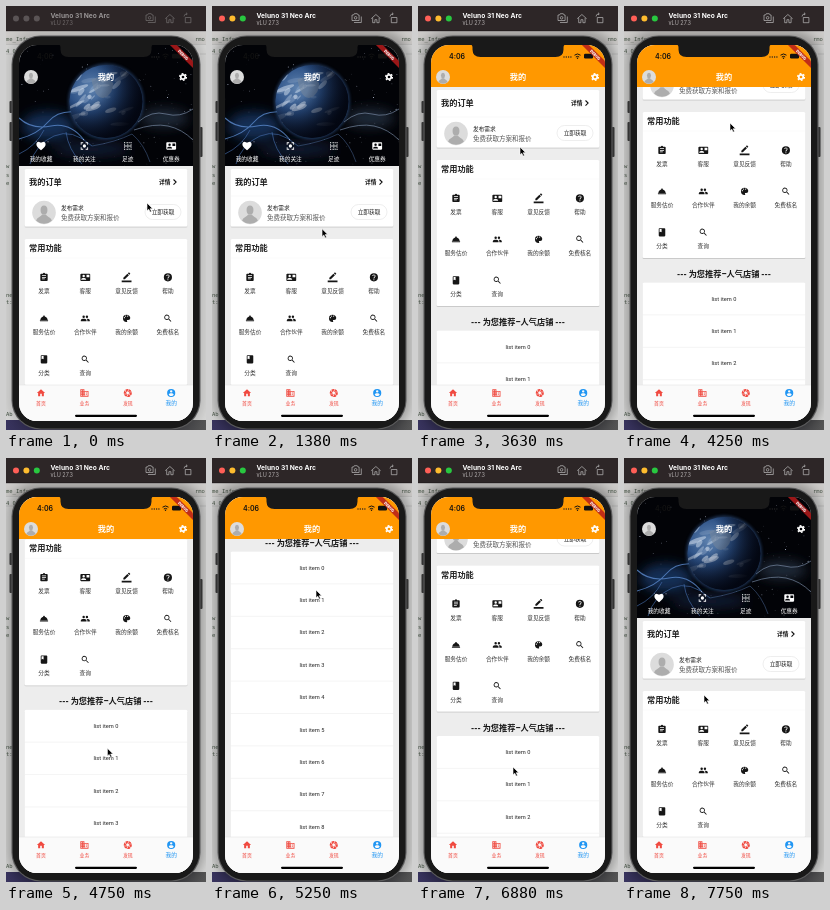
These frames come from a looping animation (200x424 px, 8 s). An HTML page:

```html
<!DOCTYPE html>
<html lang="zh-CN">
<head>
<meta charset="utf-8">
<style>
html, body { margin: 0; width: 100%; height: 100%; overflow: hidden; background: #d9d9d8; }
svg { display: block; width: 200px; height: 424px; }
text { font-family: Roboto, "Noto Sans CJK SC", "Noto Sans CJK", sans-serif; white-space: pre; }
.ui { font-family: Inter, sans-serif; }
.code { font-family: "DejaVu Sans Mono", monospace; }
</style>
</head>
<body>
<svg id="stage" viewBox="0 0 200 424" xmlns="http://www.w3.org/2000/svg"></svg>
<script>
const LOOP = 8000, STEP = 125, FOLD = 79;

const icons = {
  home: 'M10 20v-6h4v6h5v-8h3L12 3 2 12h3v8z',
  building: 'M12 7V3H2v18h20V7zM4 5h2v2H4zM8 5h2v2H8zM4 9h2v2H4zM8 9h2v2H8zM4 13h2v2H4zM8 13h2v2H8zM4 17h2v2H4zM8 17h2v2H8zM12 9h8v10h-8v-2h2v-2h-2v-2h2v-2h-2zM16 11h2v2h-2zM16 15h2v2h-2z',
  shutter: 'M9.4 10.5l4.8-8.3A10 10 0 0 0 5.700 4.250l3.600 6.350zM21.500 9a10 10 0 0 0-6-6.300L11.900 9zM21.800 10h-7.500l5 8.800A10 10 0 0 0 21.800 10zM8.500 12L4.600 5.250A10 10 0 0 0 2.200 14h7.500zM2.500 15a10 10 0 0 0 6 6.300L12.100 15zM13.700 15l-3.900 6.800a10 10 0 0 0 8.500-2l-3.700-6.400z',
  account: 'M12 2a10 10 0 1 0 0 20 10 10 0 0 0 0-20zm0 3a3 3 0 1 1 0 6 3 3 0 0 1 0-6zm0 14.2c-2.5 0-4.7-1.3-6-3.2 0-2 4-3.1 6-3.1s6 1.1 6 3.1c-1.3 1.9-3.5 3.2-6 3.2z',
  note: 'M19 3h-4.2a3 3 0 0 0-5.6 0H5a2 2 0 0 0-2 2v14a2 2 0 0 0 2 2h14a2 2 0 0 0 2-2V5a2 2 0 0 0-2-2zM14 17H7v-2h7zM17 13H7v-2h10zM17 9H7V7h10z',
  card: 'M22 3H2a2 2 0 0 0-2 2v14a2 2 0 0 0 2 2h20a2 2 0 0 0 2-2V5a2 2 0 0 0-2-2zM8 6a3 3 0 1 1 0 6 3 3 0 0 1 0-6zM14 18H2v-1c0-2 4-3.1 6-3.1s6 1.1 6 3.1zM22 12h-7V6h7z',
  pen: 'M17.7 7L14 3.3l-10 10V17h3.7zM20.7 4a1 1 0 0 0 0-1.4L18.4.3a1 1 0 0 0-1.4 0l-2 2L18.7 6zM0 20h24v4H0z',
  help: 'M12 2a10 10 0 1 0 0 20 10 10 0 0 0 0-20zM13 19h-2v-2h2zm2.1-7.7l-.9.9C13.4 12.9 13 13.5 13 15h-2v-.5c0-1.1.4-2.1 1.2-2.8l1.2-1.3A2 2 0 1 0 10 9H8a4 4 0 1 1 8 0c0 .9-.4 1.7-.9 2.3z',
  bell: 'M2 17h20v2H2zM13.8 7.8a2 2 0 1 0-3.6 0C6.2 8.6 3.3 11.9 3 16h18c-.3-4.1-3.2-7.4-7.2-8.2z',
  group: 'M16 11a3 3 0 1 0 0-6 3 3 0 0 0 0 6zM8 11a3 3 0 1 0 0-6 3 3 0 0 0 0 6zM8 13c-2.3 0-7 1.2-7 3.5V19h14v-2.5C15 14.2 10.3 13 8 13zM16 13l-1 .1c1.2.9 2 2 2 3.4V19h6v-2.5c0-2.3-4.7-3.5-7-3.5z',
  palette: 'M12 3a9 9 0 0 0 0 18c1.5 0 2-1.5 1.1-2.5-.8-1-.1-2.5 1.4-2.5H16a5 5 0 0 0 5-5c0-4.400-4-8-9-8zM5 10.500a1.500 1.500 0 1 0 3 0 1.500 1.500 0 0 0-3 0zM8 6.500a1.500 1.500 0 1 0 3 0 1.500 1.500 0 0 0-3 0zM13 6.500a1.500 1.500 0 1 0 3 0 1.500 1.500 0 0 0-3 0z',
  search: 'M15.5 14h-.8l-.3-.3a6.5 6.5 0 1 0-.7.7l.3.3v.8l5 5 1.5-1.5zM9.5 14a4.5 4.5 0 1 1 0-9 4.5 4.5 0 0 1 0 9z',
  book: 'M18 2H6a2 2 0 0 0-2 2v16a2 2 0 0 0 2 2h12a2 2 0 0 0 2-2V4a2 2 0 0 0-2-2zM6 4h5v8l-2.5-1.5L6 12z',
  heart: 'M12 21.4l-1.4-1.4C5.4 15.4 2 12.3 2 8.5A5.4 5.4 0 0 1 7.5 3c1.7 0 3.4.8 4.5 2.1A6 6 0 0 1 16.5 3 5.4 5.4 0 0 1 22 8.5c0 3.8-3.4 6.9-8.5 11.5z',
  focus: 'M12 8a4 4 0 1 0 0 8 4 4 0 0 0 0-8zM5 15H3v6h6v-2H5zM5 5h4V3H3v6h2zM15 3v2h4v4h2V3zM19 19h-4v2h6v-6h-2z'
};

const rect = (x, y, w, h, fill, more = '') =>
  `<rect x="${x}" y="${y}" width="${w}" height="${h}" fill="${fill}" ${more}/>`;
const dot = (x, y, r, fill, more = '') =>
  `<circle cx="${x}" cy="${y}" r="${r}" fill="${fill}" ${more}/>`;
const line = (d, color, w, more = '') =>
  `<path d="${d}" fill="none" stroke="${color}" stroke-width="${w}" ${more}/>`;
// y is the middle of the glyphs
const text = (x, y, s, size, fill, weight = 400, anchor = 'start', more = '') =>
  `<text x="${x}" y="${y + size * 0.36}" font-size="${size}" fill="${fill}" font-weight="${weight}" text-anchor="${anchor}" ${more}>${s}</text>`;
const mid = (x, y, s, size, fill, weight) => text(x, y, s, size, fill, weight, 'middle');

function icon(name, x, y, fill, size = 9.8) {
  const k = size / 24;
  let body = `<path d="${icons[name]}" fill="${fill}" fill-rule="evenodd"/>`;
  if (name === 'grid') {
    body = line('M4 3v18M20 3v18M3 4h18M3 20h18M12 3v18', fill, 2, 'stroke-dasharray="2 2"') + rect(3, 11, 18, 2, fill);
  } else if (name === 'gear') {
    body = dot(12, 12, 5.4, 'none', `stroke="${fill}" stroke-width="4.2"`) +
      dot(12, 12, 8.4, 'none', `stroke="${fill}" stroke-width="3.2" stroke-dasharray="4.4 4.4"`);
  }
  return `<g transform="translate(${x - size / 2} ${y - size / 2}) scale(${k})">${body}</g>`;
}

function avatar(x, y, r) {
  return dot(x, y, r, '#dcdcdc') +
    `<g transform="translate(${x} ${y}) scale(${r / 12})">` +
    '<ellipse cy="-2.5" rx="3.5" ry="4.6" fill="#adadad"/>' +
    '<path d="M-8 8.5C-7 4.5-3 4.5-2 2h4c1 2.5 5 2.5 6 6.5A12 12 0 0 1-8 8.5z" fill="#adadad"/></g>';
}

function random(seed) {
  return (a, b) => {
    seed = seed * 16807 % 2147483647;
    return +(a + seed / 2147483647 * (b - a)).toFixed(2);
  };
}

function stars() {
  const rnd = random(11);
  let out = '';
  for (let i = 0; i < 110; i++) {
    out += dot(rnd(13, 187), rnd(39, 160), rnd(0.15, 0.55), '#dbe6ff', `opacity="${rnd(0.3, 0.9)}"`);
  }
  return out;
}

function clouds() {
  const rnd = random(29);
  let out = '';
  for (let i = 0; i < 34; i++) {
    out += `<ellipse rx="${rnd(0.06, 0.28)}" ry="${rnd(0.02, 0.07)}" fill="#cfdcec" opacity="${rnd(0.15, 0.6)}" ` +
      `transform="translate(${rnd(-0.9, 0.6)} ${rnd(-0.9, 0.8)}) rotate(${rnd(-60, 0)})"/>`;
  }
  return out;
}

const planet = () => '<g transform="translate(100 95.500) scale(36.500)">' +
  '<circle r="1.04" fill="#37629f" opacity=".5" filter="url(#rim)"/><circle r="1" fill="url(#globe)"/>' +
  `<g clip-path="url(#disc)"><g filter="url(#mist)">${clouds()}` +
  '<path d="M-.4-.6Q0-.8.2-.5Q.2-.2-.05-.1Q-.3-.05-.4-.6z" fill="#77879a" opacity=".55"/></g>' +
  '<circle r="1.010" fill="url(#night)"/></g></g>';

const space = () =>
  rect(13, 39, 174, 122, '#020307') +
  '<g filter="url(#soft)">' +
  '<ellipse cx="42" cy="120" rx="26" ry="14" fill="#21457f" opacity=".65"/>' +
  '<ellipse cx="158" cy="112" rx="24" ry="9" fill="#35435a" opacity=".6"/>' +
  '<ellipse cx="85" cy="143" rx="38" ry="7" fill="#1c3156" opacity=".55"/></g>' +
  '<g filter="url(#haze)">' +
  line('M13 133Q32 128 42 116T70 106M13 112Q26 124 45 120T78 134', '#5f8fd4', 1.1, 'opacity=".75"') +
  line('M24 158Q30 138 48 130T86 140M13 148Q30 140 38 124M60 126Q62 143 76 158', '#456fae', 0.9, 'opacity=".7"') +
  line('M132 116Q146 104 160 108T187 103M128 124Q148 117 162 120T187 134', '#7d8fa9', 1, 'opacity=".65"') +
  line('M86 140Q110 136 126 128M126 128Q138 138 144 156', '#4a6691', 0.9, 'opacity=".6"') + '</g>' +
  stars() + planet() +
  [['heart', '我的收藏'], ['focus', '我的关注'], ['grid', '足迹'], ['card', '优惠券']].map(([n, s], i) =>
    icon(n, 35 + i * 43.4, 140, '#fff', i ? 9.8 : 11) + mid(35 + i * 43.4, 153, s, 5.7, '#fff')).join('');

const card = (y, h) => rect(18.5, y, 163, h, '#fff', 'rx="1.5" filter="url(#lift)"');

function content() {
  const tools = [['note', '发票'], ['card', '客服'], ['pen', '意见反馈'], ['help', '帮助'],
    ['bell', '服务估价'], ['group', '合作伙伴'], ['palette', '我的余额'], ['search', '免费核名'],
    ['book', '分类'], ['search', '查询']];
  let out = card(163, 57.5) + text(23, 176, '我的订单', 8.2, '#222', 600) +
    text(153, 176, '详情', 5.7, '#111', 600) + line('M167.5 173.5l2.6 2.6-2.6 2.6', '#111', 1.1) +
    line('M19 190H181', '#f0f0f0', 0.5) + avatar(38, 206.5, 11.8) +
    text(55, 201.5, '发布需求', 5.7, '#222') + text(55, 212, '免费获取方案和报价', 6.5, '#555') +
    rect(139, 198.5, 36, 15, '#fff', 'rx="7.5" stroke="#ddd" stroke-width=".5"') +
    mid(157, 206, '立即获取', 5.7, '#222') +
    card(233, 146) + text(23, 242.2, '常用功能', 8.2, '#222', 600) + line('M19 252H181', '#f3f3f3', 0.4);
  tools.forEach(([n, s], i) => {
    const x = 38 + i % 4 * 41.3, y = 271.3 + Math.floor(i / 4) * 41;
    out += icon(n, x, y, '#161616') + mid(x, y + 13.7, s, 5.7, '#333');
  });
  out += mid(100, 395.2, '--- 为您推荐–人气店铺 ---', 8.2, '#151515', 600) + card(403.5, 650);
  for (let i = 0; i < 12; i++) {
    const y = 403.5 + i * 32.4;
    out += mid(100, y + 16, 'list item ' + i, 5.7, '#222') + line(`M18.5 ${y + 32.4}H181.5`, '#ececec', 0.6);
  }
  return out;
}

const nav = () => rect(13, 379, 174, 37, '#fafafa') + line('M13 379H187', '#ddd', 0.5) +
  [['home', '首页'], ['building', '业务'], ['shutter', '发现'], ['account', '我的']].map(([n, s], i) => {
    const c = i < 3 ? '#f04a40' : '#2196f3', x = 35 + i * 43.4;
    return icon(n, x, 387, c) + mid(x, 397, s, i < 3 ? 4.9 : 5.7, c);
  }).join('') + rect(69, 408.7, 62, 2.2, '#000', 'rx="1.1"');

const desktop = () =>
  rect(0, 0, 200, 424, '#d8d8d7') + rect(0, 25, 200, 13, '#cdcbc9') +
  line('M0 38.5H200M0 48H8M194 48H200', '#aaa', 0.5) +
  [[0, 33, 'me_Info_In'], [189, 33, 'rmo'], [0, 45, '4 0'], [0, 160, 'w'], [0, 169, 's'], [0, 177, 'e'], [0, 289, 'ne'], [0, 296, 't:'], [0, 408, 'Ab']]
    .map(([x, y, s]) => text(x, y, s, 5.5, '#465446', 400, 'start', 'class="code"')).join('') +
  rect(0, 414, 200, 10, 'url(#dusk)') +
  '<rect id="shade" x="2" y="26" width="196" height="398" rx="28" fill="#000" filter="url(#soft)"/>';

const phone = () =>
  rect(3.5, 95, 3, 12, '#333', 'rx="1"') + rect(3.5, 116, 3, 19, '#333', 'rx="1"') +
  rect(193.5, 121, 3, 30, '#333', 'rx="1"') +
  rect(5.5, 29.5, 189, 394, '#5b5b5c', 'rx="29"') +
  rect(6.6, 30.6, 186.8, 391.8, '#191919', 'rx="28"');

const status = () =>
  text(31, 50.2, '4:06', 7, '#111', 600, 'start', 'class="ui"') +
  [146, 148.3, 150.6, 152.9].map(x => dot(x, 51, 0.7, '#222')).join('') +
  line('M156.5 49.2q3-2.5 6 0M157.8 51q1.7-1.3 3.4 0', '#111', 1) + dot(159.5, 52.2, 0.7, '#111') +
  rect(166, 47.8, 9, 4.6, '#111', 'rx="1.2"') +
  '<path d="M52 38.5h96q-2.5 0-2.5 3v2q0 7.500-8 7.500H62.500q-8 0-8-7.500v-2q0-3-2.500-3z" fill="#191919"/>' +
  `<g transform="translate(187 39) rotate(45)">${rect(-16.5, 11.4, 33, 4.9, '#b71c1c', 'opacity=".85"')}${mid(0, 13.9, 'DEBUG', 4, '#fff', 800)}</g>`;

const titleBar = () => rect(0, 0, 200, 25, '#2d2627') + line('M0 24.8H200', '#1b1718', 0.6) +
  [10, 20.4, 30.8].map(x => dot(x, 12.5, 3, '#666', 'class="light"')).join('') +
  '<g id="caption">' + text(44.5, 9.4, 'Veluno 31 Neo Arc', 6.7, '#fff', 700, 'start', 'class="ui"') +
  text(44.5, 17.4, 'vLU 27.3', 5.5, '#b5b0b1', 400, 'start', 'class="ui"') +
  line('M140 9h1.5l.8-1.300h3l.8 1.300h1v5.500H140zM142 16.500h7.300v-6', '#bbb', 0.7) +
  dot(143.6, 11.8, 1.3, 'none', 'stroke="#bbb" stroke-width=".7"') +
  line('M159.2 12.7l4.700-4.200 4.700 4.200M160.700 12v4.700h2.200v-3h2v3h2.200V12', '#bbb', 0.7) +
  line('M179.300 11.500h5.600v5.200h-5.600zM178 10.500q.2-2.600 3-2.600M180 6.700l1.300 1.200-1.300 1.200', '#bbb', 0.7) + '</g>';

const stage = document.getElementById('stage');
const blur = (id, d) => `<filter id="${id}" x="-50%" y="-50%" width="200%" height="200%"><feGaussianBlur stdDeviation="${d}"/></filter>`;
stage.innerHTML = '<defs>' + blur('soft', 6) + blur('haze', 0.6) + blur('rim', 0.05) + blur('mist', 0.02) +
  '<filter id="lift" x="-5%" y="-5%" width="110%" height="112%"><feDropShadow dx="0" dy=".5" stdDeviation=".6" flood-opacity=".3"/></filter>' +
  '<radialGradient id="globe" cx=".3" cy=".32" r=".75"><stop offset="0" stop-color="#5f83b0"/><stop offset=".45" stop-color="#294d82"/><stop offset="1" stop-color="#0a142c"/></radialGradient>' +
  '<radialGradient id="night" cx=".2" cy=".26" r=".85"><stop offset=".3" stop-color="#02050f" stop-opacity="0"/><stop offset=".95" stop-color="#02050f" stop-opacity=".92"/></radialGradient>' +
  '<linearGradient id="dusk"><stop offset="0" stop-color="#39345f"/><stop offset=".5" stop-color="#191a2a"/><stop offset="1" stop-color="#555"/></linearGradient>' +
  '<clipPath id="disc"><circle r="1"/></clipPath>' +
  '<clipPath id="screen"><rect x="13" y="39" width="174" height="376" rx="18"/></clipPath>' +
  '<clipPath id="head"><rect id="headBox" x="13" y="39" width="174"/></clipPath></defs>' +
  desktop() + phone() + '<g clip-path="url(#screen)">' + rect(13, 39, 174, 376, '#ededed') +
  `<g id="list">${content()}</g><g clip-path="url(#head)">${rect(13, 39, 174, 122, '#ff9800', 'id="bar"')}<g id="cover">${space()}</g></g>` +
  avatar(25, 71, 7) + mid(100, 70.8, '我的', 8.2, '#fff', 600) + icon('gear', 177, 71, '#fff') +
  nav() + status() + '</g>' + titleBar() +
  '<path id="cursor" d="M0 0v7.8l1.8-1.6 1.3 2.9 1.4-.6-1.3-2.8h2.5z" fill="#000" stroke="#fff" stroke-width=".6"/>';

const parts = {};
['list', 'bar', 'cover', 'headBox', 'shade', 'caption', 'cursor'].forEach(id => parts[id] = document.getElementById(id));
const lights = [...document.querySelectorAll('.light')];

// Each row: time, then values; eased between rows
const scrollKeys = [[0, 0], [2875, 0], [3500, 79], [3875, 79], [4250, 127], [4600, 127],
  [5250, 310], [5750, 310], [6875, 125.5], [7250, 125.5], [7500, 0], [LOOP, 0]];
const cursorKeys = [[0, 141, 197], [1000, 112, 222], [2875, 93, 230], [3500, 102, 141], [3625, 102, 141], [3875, 106, 165],
  [4250, 106, 117], [4600, 101, 315], [5250, 104, 132], [5750, 104, 132], [6875, 95, 309],
  [7250, 84, 112], [7500, 80, 237], [LOOP, 80, 237]];

function at(keys, t) {
  let i = 1;
  while (i < keys.length - 1 && t > keys[i][0]) i++;
  const a = keys[i - 1], b = keys[i];
  const p = (t - a[0]) / (b[0] - a[0]), e = p * p * (3 - 2 * p);
  return a.slice(1).map((v, j) => v + (b[j + 1] - v) * e);
}

function draw(now) {
  const t = Math.floor(now % LOOP / STEP) * STEP;
  const [s] = at(scrollKeys, t), [x, y] = at(cursorKeys, t);
  const fold = Math.min(1, s / FOLD), active = t >= 1125;
  parts.list.setAttribute('transform', `translate(0 ${-s})`);
  parts.headBox.setAttribute('height', 121 - fold * FOLD);
  parts.bar.setAttribute('opacity', fold > 0 ? 1 : 0);
  parts.cover.setAttribute('transform', `translate(0 ${-fold * FOLD / 4})`);
  parts.cover.setAttribute('opacity', Math.min(1, (1 - fold) / 0.29));
  parts.cursor.setAttribute('transform', `translate(${x} ${y})`);
  parts.caption.setAttribute('opacity', active ? 1 : 0.5);
  parts.shade.setAttribute('opacity', active ? 0.3 : 0.15);
  lights.forEach((l, i) => l.setAttribute('fill', active ? ['#ff5f57', '#febc2e', '#28c840'][i] : '#5a5455'));
}

const start = performance.now();
function tick() {
  draw(performance.now() - start);
  requestAnimationFrame(tick);
}
tick();
</script>
</body>
</html>
```
